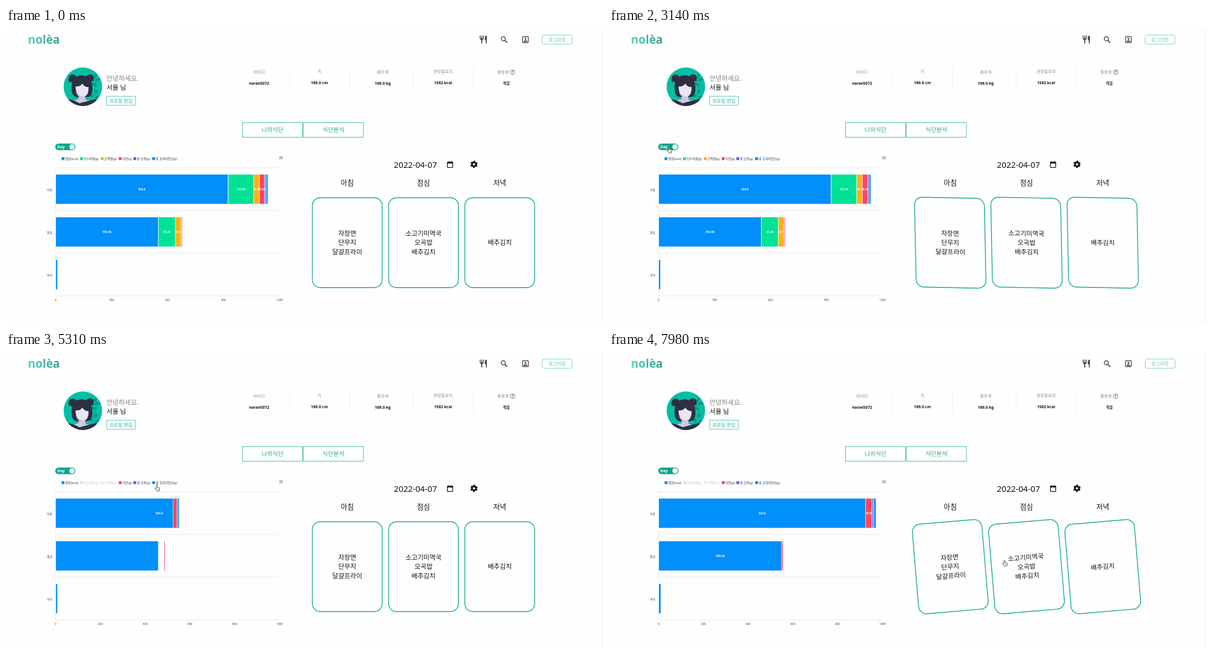
An HTML page for the animation above (8000 ms loop, 1064 by 527 pixels).

```html
<!DOCTYPE html>
<html>
<head>
<meta charset="utf-8">
<title>Diet dashboard</title>
<style>
  html, body { margin: 0; width: 100%; height: 100%; overflow: hidden; background: #fefefe; }
  svg { display: block; width: 100vw; height: 100vh; }
  text { font-family: "Noto Sans", "Noto Sans CJK KR", "Noto Sans CJK", sans-serif; }
</style>
</head>
<body>
<svg id="stage" viewBox="0 0 1064 527">
  <defs>
    <linearGradient id="brand"><stop offset="0" stop-color="#5fd3bd"/><stop offset="1" stop-color="#3a9c8c"/></linearGradient>
    <clipPath id="face"><circle cx="137" cy="104.5" r="34.5"/></clipPath>
  </defs>
</svg>
<script>
const LOOP = 8000;
const TEAL = '#14a693', MINT = '#3bb59c';
const COLORS = ['#008FFB', '#00E396', '#FEB019', '#FF4560', '#775DD0', '#008FFB'];
const MEALS = ['아침', '점심', '저녁'];
const WEEKDAYS = [...'월화수목금토일'];
const TO_WEEK = 1080, TO_DAY = 2610, HIDE_CARB = 4290, HIDE_PROTEIN = 5110, SHAKE = 6275;
const stage = document.getElementById('stage');

function add(parent, tag, attrs = {}) {
  const el = document.createElementNS('http://www.w3.org/2000/svg', tag);
  for (const k in attrs) el.setAttribute(k, attrs[k]);
  parent.appendChild(el);
  return el;
}
const group = (parent, attrs) => add(parent, 'g', attrs);
const path = (parent, d, fill, more) => add(parent, 'path', { d, fill, ...more });
const box = (parent, x, y, width, height, more) => add(parent, 'rect', { x, y, width, height, ...more });
const disc = (parent, cx, cy, r, fill, more) => add(parent, 'circle', { cx, cy, r, fill, ...more });
function label(parent, x, y, str, size, fill = '#111', weight = 400, anchor = 'middle') {
  const el = add(parent, 'text', { x, y, 'font-size': size, fill, 'font-weight': weight, 'text-anchor': anchor });
  el.textContent = str;
  return el;
}
const show = (el, on) => { el.style.display = on ? '' : 'none'; };

// ---- header and profile ----
function drawHeader(g) {
  label(g, 39, 27.5, 'nolèa', 20.5, 'url(#brand)', 600, 'start');
  path(g, 'M11 9H9V2H7v7H5V2H3v7c0 2.1 1.7 3.8 3.75 4V22h2.5v-9C11.3 12.8 13 11.1 13 9V2h-2zm5-3v8h2.5v8H21V2c-2.8 0-5 2.2-5 4z',
    '#454545', { transform: 'translate(842.3 12.2) scale(.7)' });
  disc(g, 886.3, 19.2, 3.6, 'none', { stroke: '#454545', 'stroke-width': 1.5 });
  path(g, 'M889 22l4.3 4.3', 'none', { stroke: '#454545', 'stroke-width': 1.8 });
  box(g, 920.5, 15.5, 10.5, 10.5, { rx: 1, fill: 'none', stroke: '#454545', 'stroke-width': 1.3 });
  disc(g, 925.8, 19.4, 1.7, '#454545');
  path(g, 'M922.3 24.4q0-2.4 3.5-2.4t3.5 2.4z', '#454545');
  box(g, 955.5, 12.5, 53.5, 16.5, { rx: 4, fill: 'none', stroke: '#7dd3c0' });
  label(g, 982.2, 23.7, '로그아웃', 8.4, '#5ec5ae');
  box(g, 1062.5, 0, 1.5, 527, { fill: '#f1f1f1' });
}

function drawAvatar(g) {
  const a = group(g, { 'clip-path': 'url(#face)' });
  const dark = '#2e2f41', skin = '#cdc9df';
  disc(a, 137, 104.5, 34.5, '#04bfa5');
  const leaf = (x, y, rx, ry, turn) => add(a, 'ellipse', {
    cx: x, cy: y, rx, ry, fill: '#0a9484', transform: `rotate(${turn} ${x} ${y})`
  });
  leaf(158, 86, 2, 6, 40); leaf(163, 92, 2, 5, 80); leaf(156, 100, 2, 6, 120);
  leaf(161, 113, 3, 3, 0); leaf(153, 121, 3, 2, 0); leaf(162, 123, 2, 4, 60);
  path(a, 'M154 124Q162 108 160 84', 'none', { stroke: '#0a9484', 'stroke-width': .7 });
  disc(a, 119, 90, 7.2, dark);
  disc(a, 149.5, 89, 6.8, dark);
  path(a, 'M113 97q-3-8 3-13M155 95q2-7-3-12', 'none', { stroke: dark, 'stroke-width': 1.4 });
  path(a, 'M117 111Q115 85 135 84Q155 85 154 111Q153 123 145 123H125Q118 121 117 111Z', dark);
  path(a, 'M124 104Q133 105 136 99Q140 106 147 105Q148 118 141 122L142 128Q156 130 160 140H108Q111 130 129 127L130 122Q124 118 124 104Z', skin);
  path(a, 'M124 104Q133 105 136 99Q140 106 147 105Q147 119 137 122Q125 119 124 104Z', '#e9e6f1');
  path(a, 'M111 127Q121 128 131 134Q146 130 161 126L163 142H108Z', dark);
}

function drawProfile(g) {
  drawAvatar(g);
  label(g, 179, 94, '안녕하세요.', 11.8, '#858585', 400, 'start');
  label(g, 179, 110, '서율 님', 11.6, '#111', 400, 'start');
  box(g, 179.5, 121.5, 51, 16, { fill: 'none', stroke: '#62c7b3' });
  label(g, 204.8, 132.6, '프로필 편집', 8.5, MINT);
  const stats = [
    ['아이디', 451, 81, 'narae5072', 451, 100.6], ['키', 558.7, 80.3, '166.0 cm', 558.7, 99.6],
    ['몸무게', 671.5, 81, '166.0 kg', 671.5, 100.6], ['권장칼로리', 779, 80.3, '1562 kcal', 779, 99.8],
    ['활동량', 886, 81, '적음', 892, 100.6]
  ];
  for (const [name, x, y, value, vx, vy] of stats) {
    label(g, x, y, name, 7.4, '#8a8a8a');
    label(g, vx, vy, value, value === '적음' ? 6.4 : 7, '#111', 600);
  }
  for (const x of [505, 612, 725, 832]) box(g, x, 71, 1, 37, { fill: '#eeeeee' });
  disc(g, 903, 78.6, 4, 'none', { stroke: '#666', 'stroke-width': .9 });
  label(g, 903, 81.1, '?', 6.6, '#555', 600);
  ['나의식단', '식단분석'].forEach((name, i) => {
    box(g, 421.5 + i * 108.5, 168.5, 107, 26, { fill: 'none', stroke: '#48bba5' });
    label(g, 475 + i * 108.4, 184.8, name, 10.6, '#2eaa92');
  });
}

// ---- toggle ----
function makeToggle(name, fill, knob, x) {
  const g = group(stage);
  box(g, 87.7, 205.8, 36, 11.6, { rx: 5.8, fill });
  disc(g, knob, 211.6, 4.7, '#fff');
  label(g, x, 214.2, name, 7, '#fff', 700, 'start');
  return g;
}

// ---- charts ----
const TOP = 249, BOTTOM = 477, RIGHT = 487.5;
const dayData = [
  [924.8, 137.44, 29.31, 28.65, 7.5, 10],
  [550.48, 91.29, 30.73, 6, 2, 1.5],
  [10, 0, 0, 0, 0, 0]
];
const weekData = WEEKDAYS.map(() => [0, 0, 0, 0, 0, 0]);
weekData[2] = [497.64, 177, 15, 8, 3, 3];
weekData[3] = [1485.94, 459.09999999999994, 62, 37, 14, 10];

// Calls fn(series, value, x, width) along one stacked row.
function eachBar(row, hidden, c, fn) {
  let x = c.left;
  row.forEach((v, s) => {
    if (hidden.includes(s) || !v) return;
    const w = v / c.max * (RIGHT - c.left);
    fn(s, v, x, w);
    x += w;
  });
}
const rowHeight = c => (BOTTOM - TOP) / c.data.length;
const rowMid = (c, i) => TOP + rowHeight(c) * (i + .5);

function drawRow(parent, c, i, hidden, skip) {
  const g = group(parent), h = rowHeight(c) * .7;
  eachBar(c.data[i], hidden, c, (s, v, x, w) => {
    if (s === skip) return;
    box(g, x, rowMid(c, i) - h / 2, w, h, { fill: COLORS[s], stroke: '#fff', 'stroke-width': .8, 'data-s': s });
  });
  return g;
}

function makeChart(c, hidden = []) {
  const g = group(stage);
  const n = c.data.length, step = rowHeight(c);
  for (let i = 0; i <= n; i++) box(g, c.left, TOP + step * i - .5, RIGHT - c.left, 1, { fill: '#e9e9e9' });
  box(g, c.left - .5, TOP, .8, BOTTOM - TOP, { fill: '#e4e4e4' });
  c.names.forEach((name, i) => label(g, c.nameX, rowMid(c, i) + 3.3 - (n > 3 ? 1.2 : 0), name, 5, '#373d3f', 400, 'end'));
  for (let v = 0; v <= c.max; v += c.tick)
    label(g, c.left + v / c.max * (RIGHT - c.left), 486, v, 5, '#373d3f');
  const rows = c.data.map((_, i) => drawRow(g, c, i, hidden));
  const marks = group(g);
  c.data.forEach((row, i) => eachBar(row, hidden, c, (s, v, x, w) => {
    if (v > 28 && (n === 3 || v > 400))
      label(marks, x + w / 2, rowMid(c, i) + 1.7, v, 4.9, '#fff', 700).dataset.s = s;
  }));
  return { g, rows, left: c.left };
}

const legendNames = ['열량(kcal)', '탄수화물(g)', '단백질(g)', '지방(g)', '총 당류(g)', '총 포화지방산(g)'];
const legendX = [99, 132, 169, 201, 227, 260.5];
function makeLegend() {
  for (let i = 0; i < 3; i++) box(stage, 487, 228.6 + i * 1.9, 6.6, .9, { fill: '#6e8192' });
  return legendNames.map((name, i) => {
    const g = group(stage);
    box(g, legendX[i], 230, 5.2, 5.2, { rx: .8, fill: COLORS[i] });
    label(g, legendX[i] + 6.6, 234.8, name, 5.4, '#373d3f', 400, 'start');
    return g;
  });
}

// ---- meal cards ----
function makeCard(parent, cx, cy, w, h, lines, o) {
  const g = group(parent);
  box(g, -w / 2, -h / 2, w, h, { rx: o.rx, fill: '#fefefe', stroke: TEAL, 'stroke-width': o.stroke });
  lines.forEach((line, i) =>
    label(g, 0, (i - (lines.length - 1) / 2) * o.gap + o.size * .36, line, o.size, '#111', o.weight));
  return { g, cx, cy };
}
const pose = (card, transform) => card.g.setAttribute('transform', `translate(${card.cx} ${card.cy}) ${transform}`);

const lunch = [['자장면', '단무지', '달걀프라이'], ['소고기미역국', '오곡밥', '배추김치'], ['배추김치']];

function makeDayPanel() {
  const g = group(stage);
  label(g, 729.7, 248.5, '2022-04-07', 14.7, '#111', 500);
  box(g, 786.7, 239, 9.4, 9.4, { rx: .8, fill: 'none', stroke: '#111', 'stroke-width': 1.3 });
  box(g, 786.2, 238.6, 10.4, 2.6, { fill: '#111' });
  path(g, 'M788.6 237.2v2M794.2 237.2v2', 'none', { stroke: '#111', 'stroke-width': 1.4 });
  const cards = MEALS.map((name, i) => {
    const x = 608.2 + i * 135.9;
    label(g, x, 279.6, name, 12.6, '#111', 500);
    return makeCard(g, x, 382.2, 124.4, 160, lunch[i], { rx: 14, stroke: 1.4, size: 11.6, gap: 16.5, weight: 500 });
  });
  const halo = disc(g, 834, 243, 8.6, '#dfe6e8');
  const gear = group(g, { fill: 'none', transform: 'translate(834 242.8)' });
  disc(gear, 0, 0, 3.5, 'none', { 'stroke-width': 2.9 });
  disc(gear, 0, 0, 5.2, 'none', { 'stroke-width': 2.6, 'stroke-dasharray': '3 2.445', transform: 'rotate(13.5)' });
  return { g, cards, halo, gear };
}

function makeWeekPanel() {
  const g = group(stage), cards = [];
  WEEKDAYS.forEach((d, i) => label(g, 574 + i * 65.65, 216, d, 11.5, '#111', 500));
  MEALS.forEach((m, r) => {
    label(g, 518.7, 284.7 + r * 66.7, m, 10.6, '#111', 500);
    for (let i = 0; i < 7; i++) {
      let lines = ['빈 식단'];
      if (i === 3) lines = lunch[r];
      if (i === 2 && r === 0) lines = ['캘리포니아롤', '아메리카노'];
      cards.push(makeCard(g, 574 + i * 65.65, 267.7 + r * 82.7, 60.6, 80.2, lines,
        { rx: 12, stroke: 1.2, size: 7.4, gap: 10.6, weight: 400 }));
    }
  });
  return { g, cards };
}

// ---- build ----
drawHeader(group(stage));
drawProfile(group(stage));
const dayToggle = makeToggle('Day', '#0aa58c', 117.6, 91.3);
const weekToggle = makeToggle('Week', '#69ba8a', 93.3, 101);
const clickDot = disc(stage, 106.5, 212.5, 5.5, '#ffe800', { opacity: .85, style: 'mix-blend-mode:multiply' });

const dayChart = { data: dayData, names: MEALS, nameX: 82.3, left: 88.5, max: 1200, tick: 300 };
const narrow = { ...dayChart, max: 1000, tick: 200 };
const weekChart = { data: weekData, names: WEEKDAYS, nameX: 77.6, left: 84, max: 2500, tick: 500 };
const full = makeChart(dayChart);
const noCarb = makeChart(dayChart, [1]);
const noProtein = makeChart(narrow, [1, 2]);
const week = makeChart(weekChart);
// Rows that wait in their former place until their turn to grow.
noCarb.waiting = dayData.map((_, i) => drawRow(noCarb.g, dayChart, i, [], 1));
noProtein.waiting = dayData.map((_, i) => drawRow(noProtein.g, dayChart, i, [1], 2));
const dimmable = [...full.g.querySelectorAll('[data-s]')].filter(el => el.dataset.s !== '1');
const legend = makeLegend();
const dayPanel = makeDayPanel();
const weekPanel = makeWeekPanel();
const cursor = group(stage);
path(cursor, 'M-2-4.6q0-1 .9-1t.9 1V-1.4l3 .6q1.3 .3 1.2 1.6L3.2 5H-1.4L-4.2 .9q-.4-1.1 .7-1L-2 1Z', '#fff',
  { stroke: '#333', 'stroke-width': .8, 'stroke-linejoin': 'round' });
path(cursor, 'M.6 1.4v2M2.2 1.4v2', 'none', { stroke: '#333', 'stroke-width': .5 });

// ---- motion ----
const clamp = v => Math.min(1, Math.max(0, v));
const sine = p => .5 - Math.cos(Math.PI * clamp(p)) / 2;

// CSS "ease": cubic-bezier(.25, .1, .25, 1)
function ease(p) {
  let lo = 0, hi = 1, u = p;
  for (let i = 0; i < 18; i++) {
    u = (lo + hi) / 2;
    const x = .75 * u * (1 - u) * (1 - u) + .75 * u * u * (1 - u) + u * u * u;
    if (x < p) lo = u; else hi = u;
  }
  return .3 * u * (1 - u) * (1 - u) + 3 * u * u * (1 - u) + u * u * u;
}

// Halving skew that flips sign every ninth of a second.
function jello(ms) {
  const at = n => n < 2 || n > 8 ? 0 : -12.5 * Math.pow(-.5, n - 2);
  const p = clamp(ms / 1000) * 9, n = Math.floor(p);
  return at(n) + (at(n + 1) - at(n)) * ease(p - n);
}

function tilt(ms) {
  if (ms < 0) return 0;
  const turn = [0, 5, 0, -5, 0], p = ms % 300 / 75, n = Math.floor(p);
  return turn[n] + (turn[n + 1] - turn[n]) * ease(p - n);
}

const track = [
  [70, 1008, 500], [480, 63, 118], [810, 108, 217.5], [3410, 108, 217.5], [3900, 143, 236.5],
  [4290, 143, 236.5], [4600, 175, 237], [5110, 175, 237], [5860, 744, 268], [6200, 836, 244.5],
  [6400, 836, 244.5], [6680, 768, 310], [7500, 720, 362], [7980, 706, 376]
];
function cursorAt(t) {
  const i = track.findIndex(k => k[0] > t);
  if (i < 0) return track[track.length - 1].slice(1);
  const [t0, x0, y0] = track[i - 1], [t1, x1, y1] = track[i];
  const p = sine((t - t0) / (t1 - t0));
  return [x0 + (x1 - x0) * p, y0 + (y1 - y0) * p];
}

const delays = [0, 365, 380];
function grow(chart, ms) {
  chart.rows.forEach((row, i) => {
    const started = ms >= delays[i];
    show(row, started);
    show(chart.waiting[i], !started);
    const k = sine((ms - delays[i]) / 370);
    row.setAttribute('transform', `translate(${chart.left * (1 - k)} 0) scale(${k} 1)`);
  });
}

function draw(t) {
  const isWeek = t >= TO_WEEK && t < TO_DAY;
  show(weekToggle, isWeek); show(dayToggle, !isWeek);
  show(week.g, isWeek); show(weekPanel.g, isWeek); show(dayPanel.g, !isWeek);
  show(clickDot, t >= 2470 && t < TO_DAY);

  show(full.g, !isWeek && t < HIDE_CARB);
  show(noCarb.g, t >= HIDE_CARB && t < HIDE_PROTEIN);
  show(noProtein.g, t >= HIDE_PROTEIN);
  grow(noCarb, t - HIDE_CARB);
  grow(noProtein, t - HIDE_PROTEIN);
  const dim = 1 - .28 * clamp((t - 3700) / 150);
  dimmable.forEach(el => el.setAttribute('opacity', dim));
  legend[1].setAttribute('opacity', t >= HIDE_CARB ? .28 : 1);
  legend[2].setAttribute('opacity', t >= HIDE_PROTEIN ? .28 : 1);

  const wobble = jello(t - (t < TO_DAY ? TO_WEEK : TO_DAY) + 40);
  const skew = `skewX(${wobble}) skewY(${wobble})`;
  weekPanel.cards.forEach(c => pose(c, skew));
  const turn = `rotate(${tilt(t - SHAKE)})`;
  dayPanel.cards.forEach(c => pose(c, t < SHAKE ? skew : turn));

  const hover = t >= 6130 && t < 6450;
  show(dayPanel.halo, hover);
  dayPanel.gear.setAttribute('stroke', hover ? TEAL : '#111');

  show(cursor, t >= 70);
  if (t >= 70) cursor.setAttribute('transform', `translate(${cursorAt(t).join(' ')})`);
}

const start = performance.now();
function tick() {
  draw((performance.now() - start) % LOOP);
  requestAnimationFrame(tick);
}
draw(0);
requestAnimationFrame(tick);
</script>
</body>
</html>
```
